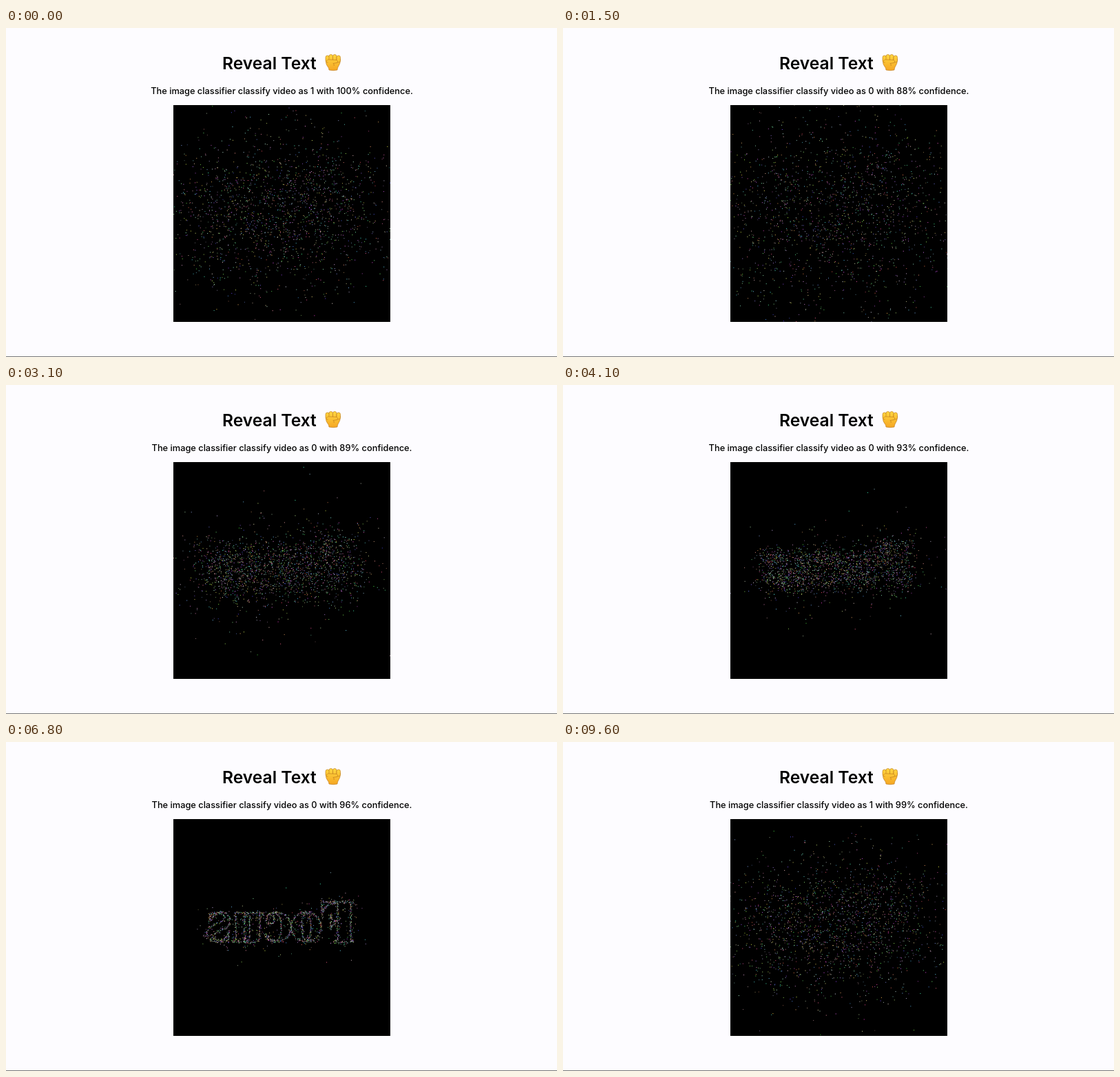
Recreate the animation shown at these times as an HTML page with a canvas. Size 800 by 478 pixels, loop 9.7 s.

```html
<!DOCTYPE html>
<html lang="en">
<head>
<meta charset="utf-8">
<title>Reveal Text</title>
<style>
  html, body { margin: 0; width: 100%; height: 100%; overflow: hidden; background: #fdfcff; }
  svg, canvas { position: absolute; left: 0; top: 0; }
  canvas { left: 243px; top: 112px; background: #000; }
  text { font-family: Inter, sans-serif; fill: #000; }
</style>
</head>
<body>
<svg width="800" height="478" viewBox="0 0 800 478">
  <defs>
    <linearGradient id="skin" gradientUnits="userSpaceOnUse" x1="0" y1="38" x2="0" y2="62">
      <stop offset="0" stop-color="#ffd840"/>
      <stop offset="1" stop-color="#f5a623"/>
    </linearGradient>
  </defs>
  <text x="314" y="60" font-size="24.600" font-weight="600">Reveal Text</text>
  <g fill="url(#skin)" stroke="#b9741a" stroke-width=".6" stroke-linejoin="round">
    <path d="M464.500 46Q464 53 467 56Q469 58 469 61Q475 62.500 481 61Q481 58 483 55Q485.500 52 485.500 45Z"/>
    <rect x="464" y="40" width="5.500" height="10" rx="2.700"/>
    <rect x="469" y="38.500" width="5.500" height="10" rx="2.700"/>
    <rect x="474.500" y="38.500" width="5.500" height="10" rx="2.700"/>
    <rect x="480" y="40" width="5.500" height="10" rx="2.700"/>
    <path d="M465 48Q467 45 471 46L480 46.500Q483 48 481 50.500L475 51.500Q477 53 476 55"/>
  </g>
  <text id="caption" x="400.500" y="96" font-size="12.800" font-weight="500" text-anchor="middle"></text>
  <path d="M0 477.500H800" stroke="#777"/>
</svg>
<canvas id="view" width="315" height="315"></canvas>
<script>
const LOOP = 9700, STEP = 100, COUNT = 1900;
const BURST = 8850, GATHER = 1.85;   // ms into the loop, seconds after the burst
const SPREAD = 105;

// Mirrored word, one outline per letter, in stage coordinates
const WORD = [
  'M504 232H458V250Q463 234 475 234H481V260Q472 260 471 250V272Q472 262 481 262V288H476V290H504V288H500V234H504Z',
  'M414 268a21.500 21.500 0 1 0 43 0a21.500 21.500 0 1 0-43 0Z M429 268a6.500 20 0 1 0 13 0a6.500 20 0 1 0-13 0Z',
  'M375 280Q382 291 392 290A21 21 0 0 0 413 268A21 21 0 0 0 393 247Q378 247 377 258q0 6 6 6q6 0 6-6q0-5-4-8Q398 245 399 268Q399 289 390 288Q382 288 377 279Z',
  'M373 248H353V282Q353 288 349 287Q346 284 346 278V250H351V248H333V288H328V290H346V283Q342 291 354 291Q368 291 368 280V250H373Z',
  'M296 248V261Q300 249 309 249Q317 249 317 254Q317 259 305 263Q291 268 291 278Q291 290 307 290Q313 290 319 287L323 290V275Q319 288 308 288Q300 288 300 283Q300 277 312 273Q325 269 325 259Q325 247 310 247Q304 247 299 250Z'
].join(' ');

// Start time, class, confidence
const RESULTS = [
  [0, 1, 100], [1000, 0, 88], [2000, 0, 85], [3000, 0, 89], [4000, 0, 93], [5000, 0, 97],
  [5600, 0, 98], [6600, 0, 96], [7700, 0, 94], [8800, 1, 100], [9500, 1, 99]
];

let seed = 7;
function random() {
  seed = (seed * 16807) % 2147483647;
  return seed / 2147483647;
}
const gauss = () => Math.sqrt(-2 * Math.log(random())) * Math.cos(2 * Math.PI * random());
const channel = () => Math.round(60 + 170 * random());

const outline = document.createElementNS('http://www.w3.org/2000/svg', 'path');
outline.setAttribute('d', WORD);
const length = outline.getTotalLength();

const dots = Array.from({ length: COUNT }, (_, i) => {
  const home = outline.getPointAtLength(length * i / COUNT);
  return {
    x: home.x - 243 + 0.4 * gauss(),
    y: home.y - 112 + 0.4 * gauss(),
    dx: SPREAD * gauss(),
    dy: SPREAD * gauss(),
    rate: 0.9 - 0.68 * random() ** 4,
    color: `rgb(${channel()},${channel()},${channel()})`
  };
});

const caption = document.getElementById('caption');
const ctx = document.getElementById('view').getContext('2d');

// Share of the full offset: steady flight outwards, then exponential return
function distance(rate, u) {
  if (u > GATHER) return Math.exp(-rate * (u - GATHER));
  const rest = Math.exp(-rate * (LOOP / 1000 - GATHER));
  return rest + (1 - rest) * Math.min(1, u / 1.65);
}

function draw(now) {
  const t = Math.floor((now % LOOP) / STEP) * STEP;
  const [, label, percent] = RESULTS.filter(r => r[0] <= t).pop();
  caption.textContent = `The image classifier classify video as ${label} with ${percent}% confidence.`;

  const u = ((t - BURST + LOOP) % LOOP) / 1000;
  ctx.clearRect(0, 0, 315, 315);
  for (const d of dots) {
    const k = distance(d.rate, u);
    ctx.fillStyle = d.color;
    ctx.fillRect(d.x + d.dx * k, d.y + d.dy * k, 1, 1);
  }
}

const start = performance.now();
function tick() {
  draw(performance.now() - start);
  requestAnimationFrame(tick);
}
tick();
</script>
</body>
</html>
```
